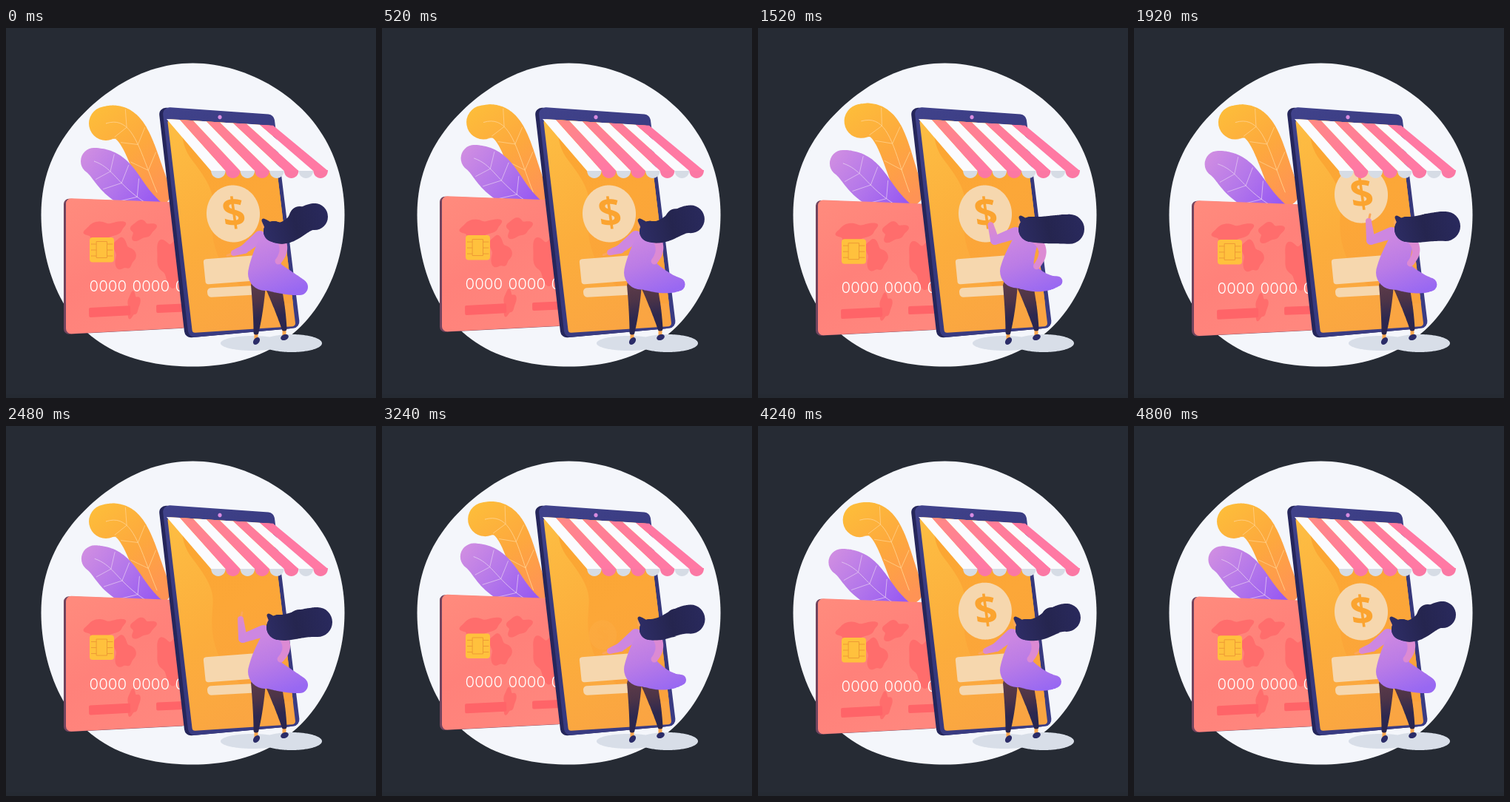
These frames come from a looping animation (500x500 px, 4.84 s). An HTML page with a canvas:

```html
<!DOCTYPE html>
<html lang="en">
<head>
<meta charset="utf-8">
<title>Mobile shop</title>
<style>
html, body { margin: 0; width: 100%; height: 100%; overflow: hidden; background: #262b34; }
canvas { display: block; width: 500px; height: 500px; }
</style>
</head>
<body>
<canvas id="stage" width="500" height="500"></canvas>
<script>
const ctx = document.getElementById('stage').getContext('2d');
const LOOP = 4840, SWAY = LOOP / 2, TAU = 2 * Math.PI;
const { sin, cos } = Math;

const mix = (a, b, k) => a + (b - a) * k;
const ease = (t, from, to) => {
  const k = Math.min(1, Math.max(0, (t - from) / (to - from)));
  return k * k * (3 - 2 * k);
};
const pt = (x, y) => ({ x, y });
const between = (a, b, k) => pt(mix(a.x, b.x, k), mix(a.y, b.y, k));

// Point at k on a Bezier curve with any number of control points.
function along(curve, k) {
  while (curve.length > 1) curve = curve.slice(1).map((p, i) => between(curve[i], p, k));
  return curve[0];
}

function gradient(x0, y0, x1, y1, ...colors) {
  const g = ctx.createLinearGradient(x0, y0, x1, y1);
  colors.forEach((c, i) => g.addColorStop(i / (colors.length - 1), c));
  return g;
}

// Soft body: circles of changing radius along a curve.
function sweep(curve, radius, fill, steps = 60) {
  ctx.beginPath();
  for (let i = 0; i <= steps; i++) {
    const k = i / steps, { x, y } = along(curve, k), r = radius(k);
    ctx.moveTo(x + r, y);
    ctx.arc(x, y, r, 0, TAU);
  }
  ctx.fillStyle = fill;
  ctx.fill();
}

// Closed outline around a centre, radius given by angle.
function ring(x, y, rx, ry, radius, fill, turn = 0) {
  ctx.save();
  ctx.translate(x, y);
  ctx.rotate(turn);
  ctx.beginPath();
  for (let a = 0; a < TAU; a += TAU / 180) {
    const r = radius(a);
    ctx.lineTo(rx * r * cos(a), ry * r * sin(a));
  }
  ctx.fillStyle = fill;
  ctx.fill();
  ctx.restore();
}
const oval = (x, y, rx, ry, fill, turn) => ring(x, y, rx, ry, () => 1, fill, turn);

// Rounded four-cornered sheet.
function sheet(corners, r, fill) {
  const start = between(corners[0], corners[3], 0.5);
  ctx.beginPath();
  ctx.moveTo(start.x, start.y);
  corners.forEach((p, i) => {
    const next = corners[(i + 1) % 4];
    ctx.arcTo(p.x, p.y, next.x, next.y, r);
  });
  ctx.closePath();
  ctx.fillStyle = fill;
  ctx.fill();
}

// Bar in a slanted plane.
function bar(x, y, w, h, r, fill, rise, lean = 0.1) {
  ctx.save();
  ctx.transform(1, -rise, lean, 1, x, y);
  ctx.beginPath();
  ctx.roundRect(0, 0, w, h, r);
  ctx.fillStyle = fill;
  ctx.fill();
  ctx.restore();
}

function line(color, width, ...points) {
  ctx.beginPath();
  points.forEach(p => ctx.lineTo(p.x, p.y));
  ctx.strokeStyle = color;
  ctx.lineWidth = width;
  ctx.lineCap = ctx.lineJoin = 'round';
  ctx.stroke();
}

function moved(dx, dy, draw, turn = 0, pivot = pt(0, 0)) {
  ctx.save();
  ctx.translate(pivot.x + dx, pivot.y + dy);
  ctx.rotate(turn);
  ctx.translate(-pivot.x, -pivot.y);
  draw();
  ctx.restore();
}

function backdrop() {
  ctx.fillStyle = '#262b34';
  ctx.fillRect(0, 0, 500, 500);
  ctx.fillStyle = '#252a32';
  ctx.fillRect(0, 495, 500, 5);
  ring(252.5, 252.5, 1, 1, a =>
    205 + sin(2 * a) ** 2 * (2.5 + 6 * sin(a) - 2 * sin(2 * a)), '#f4f6fb');
}

function leaf(spine, radius, fill, veinColor) {
  sweep(spine, radius, fill);
  const steps = Array.from({ length: 21 }, (_, i) => along(spine, i / 20));
  line(veinColor, 0.9, ...steps);
  for (const k of [0.2, 0.45, 0.7]) {
    const root = along(spine, k + 0.12), p = along(spine, k), q = along(spine, k + 0.01);
    const len = Math.hypot(q.x - p.x, q.y - p.y), r = radius(k) * 0.9 / len;
    for (const side of [-1, 1]) {
      line(veinColor, 0.8, pt(p.x - side * (q.y - p.y) * r, p.y + side * (q.x - p.x) * r), root);
    }
  }
}

const orangeLeaf = () => leaf([pt(135, 129), pt(172, 117), pt(180, 165), pt(204, 222)],
  k => 23 - 4 * k, gradient(125, 110, 215, 225, '#fdbc3a', '#fda83e', '#ff9355'), '#ffd08a');

const purpleLeaf = () => leaf([pt(119, 180), pt(148, 190), pt(150, 215), pt(200, 243)],
  k => 18 - 6 * k + 11 * sin(Math.PI * k),
  gradient(105, 170, 195, 240, '#cf8de2', '#b477ea', '#985af2'), '#e2c4f0');

function continent(x, y, rx, ry, turn, seed) {
  ring(x, y, rx, ry, a => 0.88 + 0.14 * sin(3 * a + seed) + 0.1 * sin(5 * a + 2 * seed), '#ff6d6c', turn);
}

function card() {
  const face = [pt(81, 230), pt(242, 236), pt(248, 405), pt(81, 413.5)];
  sheet(face.map(p => pt(p.x - 3, p.y + 0.5)), 7, '#71445e');
  sheet(face, 7, gradient(85, 230, 200, 410, '#ff8b7d', '#ff817a', '#ff877e'));
  continent(132, 274, 31, 14, -0.2, 2);
  continent(159, 306, 15, 24, -0.25, 0.6);
  continent(184, 273, 19, 14, -0.3, 1);
  continent(223, 314, 21, 34, -0.1, 3);
  continent(172, 374, 9, 19, 0.1, 2);
  bar(112, 378, 56, 13, 2, '#ff6468', 0.05, 0.02);
  bar(203, 374, 45, 11, 2, '#ff6468', 0.04, 0.02);

  bar(113, 283, 33, 33.5, 4, '#ffc13d', 0, 0);
  ctx.strokeStyle = '#ee9a35';
  ctx.lineWidth = 1;
  ctx.strokeRect(122.5, 288.5, 14, 22);
  for (const y of [292, 300, 308]) {
    for (const x of [115, 137]) line('#ee9a35', 1, pt(x, y), pt(x + 7, y));
  }
  ctx.fillStyle = '#fff';
  ctx.textAlign = 'left';
  ctx.textBaseline = 'alphabetic';
  ctx.font = '300 20.5px Inter, "Open Sans", sans-serif';
  ['0000', '0000', '0'].forEach((digits, i) => ctx.fillText(digits, 112.5 + 58 * i, 356));
}

function coin(t) {
  let x = 307, y = 251, size = 1, alpha = 1;
  if (t < 2800) {
    y = mix(251, 156, ease(t, 1680, 2380));
    if (t > 2380) return;
  } else {
    const grow = ease(t, 3180, 3660), settle = ease(t, 3720, 4400);
    x = mix(298, 306.3, grow) + 0.7 * settle;
    y = mix(284, 245, grow) + 6 * settle;
    size = mix(0.5, 1, grow);
    alpha = grow;
  }
  ctx.save();
  ctx.globalAlpha = alpha;
  ctx.translate(x, y);
  ctx.scale(size, size);
  oval(0, 0, 36, 38.5, '#f6d7ae', -0.1);
  ctx.transform(1, -0.06, 0.14, 1, 0, 0);
  ctx.font = 'bold 54px "Open Sans", sans-serif';
  ctx.textAlign = 'center';
  ctx.textBaseline = 'alphabetic';
  ctx.fillStyle = '#fba430';
  ctx.fillText('$', 1, 17.5);
  ctx.restore();
}

function tablet(t) {
  const body = [pt(211, 106.5), pt(362, 117), pt(397.5, 405), pt(247, 418.5)];
  sheet(body.map(p => pt(p.x - 5, p.y + 0.5)), 9, '#25265b');
  sheet(body, 9, gradient(215, 110, 390, 410, '#40428b', '#35377a', '#3b3d85'));
  sheet([pt(218, 123), pt(359, 132), pt(391.5, 403), pt(252, 412)], 4,
    gradient(225, 140, 380, 390, '#fdbc42', '#fcad3c', '#faa443'));
  ctx.save();
  ctx.clip();
  sweep([pt(300, 140), pt(345, 240), pt(330, 290), pt(400, 310)], k => 62 - 12 * sin(TAU * k),
    gradient(240, 140, 380, 350, '#fba631', '#fca738', '#faa23c'));
  bar(266.5, 312.5, 80, 34, 4, '#f6d7ae', 0.075);
  bar(271.5, 351.5, 78, 12.5, 5, '#f6d7ae', 0.055);
  coin(t);
  ctx.restore();
  oval(289, 120.5, 2.6, 2.8, '#d88be0');
}

function awning() {
  const top = i => pt(217 + 18 * i, 123 + 1.1 * i);
  const low = i => pt(277 + 19.75 * i, 193);
  for (let i = 0; i < 8; i++) {
    const [a, b, c, d] = [top(i), top(i + 1), low(i + 1), low(i)], pink = i % 2;
    ctx.beginPath();
    ctx.moveTo(d.x, d.y - 1);
    ctx.bezierCurveTo(d.x, 206.5, c.x, 206.5, c.x, c.y - 1);
    ctx.fillStyle = pink ? '#fb78a4' : '#d6dce5';
    ctx.fill();
    ctx.beginPath();
    [a, b, c, d].forEach(p => ctx.lineTo(p.x, p.y));
    ctx.fillStyle = pink
      ? gradient(a.x, a.y, d.x, d.y, `rgb(255, ${140 - 3 * i}, ${126 + 5 * i})`, '#ff79a4')
      : '#fbfbfe';
    ctx.fill();
  }
}

function legs() {
  oval(333, 426, 43, 10, '#d8dee8');
  oval(386, 426, 41, 12, '#d8dee8');
  const skin = '#f9a74f', navy = '#2b2c68';
  const tights = gradient(340, 345, 350, 415, '#5d3b49', '#4d3447', '#2d284f', '#28254e');
  const leg = (hip, knee, ankle, width, turn) => {
    line(skin, 5, ankle, pt(ankle.x, ankle.y + 9));
    sweep([hip, knee, ankle], k => mix(width, 3.5, k), tights);
    oval(ankle.x + 0.5, ankle.y + 12, 5.5, 3.8, navy, turn);
  };
  leg(pt(341, 348), pt(341, 385), pt(338, 411), 10, -0.9);
  leg(pt(361, 348), pt(371, 380), pt(376, 406), 11, -0.4);
}

function woman(t, sway) {
  const raise = ease(t, 480, 940) * (1 - ease(t, 2540, 3060));
  const swipe = raise * ease(t, 1400, 1900);
  const skin = '#fba659', lilac = '#cd87e1';
  legs();

  const shoulder = pt(343 + 5 * raise, 282 - 5 * raise);
  const elbow = between(pt(322, 299), pt(320, 287), raise);
  const wrist = between(pt(308, 304), pt(314 + 3 * swipe, 267 - 6 * swipe), raise);
  const finger = between(pt(299, 307.5), pt(312 + 7 * swipe, 263 - 11 * swipe), raise);
  oval(350 + 6 * raise, 266 - 2 * raise, 5, 7, skin);
  line(skin, 3, wrist, finger);
  sweep([shoulder, elbow], k => 8 - 2 * k, lilac);
  sweep([elbow, wrist], k => 6 - 2 * k, gradient(elbow.x, elbow.y, finger.x, finger.y, lilac, '#e28cc6'));

  const coat = gradient(345, 270, 378, 360, '#d28be0', '#bb7ce6', '#9868f2');
  sweep([pt(360 + 4 * raise, 286 - 3 * raise), pt(350 + raise, 312), pt(350, 332 - 4 * sway)],
    k => 16 + 7 * k, coat);
  sweep([pt(352, 332 - 4 * sway), pt(370, 341), pt(387, 347), pt(397 + 9 * sway, 350 - 9 * sway)],
    k => mix(22, 11 - 5 * sway, k), coat);

  const out = raise * (3 + 6.5 * sway);
  sweep([pt(371 + 3 * raise, 285), pt(380 + 1.6 * out, 300), pt(368 + out, 315 + 8 * raise * sway)],
    k => 6 - 1.5 * k, '#dc8ad3');

  const nape = pt(362 + 7 * raise, 275 - 3 * raise);
  const crown = pt(348 + 7 * raise, 260 - 4 * raise);
  const end = pt(417 + 4 * raise, 255 + 8 * sway + 10 * raise);
  const dip = (1 - raise) * (1 - sway);
  const hair = gradient(348, 275, 434, 255, '#2e2d66', '#25254f', '#29295c');
  sweep([crown, nape], k => 2.5 + 7 * k, hair);
  sweep([nape, pt(385, mix(274, 285, dip)), pt(397, end.y)], () => 14 + 3 * raise, hair);
  sweep([nape, pt(385, mix(274, 285, dip)), pt(397, end.y), end],
    k => mix(14 + 3 * raise, 18 + 2 * (1 - dip), k), hair);
}

function render(now) {
  const t = Math.floor((now % LOOP) / 40) * 40;
  const phase = TAU * t / SWAY;
  const drift = sin(phase), sway = (1 - cos(phase)) / 2;
  backdrop();
  moved(0, 0, orangeLeaf, 0.05 * sway, pt(212, 235));
  moved(5 * drift, -3 * drift, purpleLeaf, 0.012 * drift, pt(205, 235));
  moved(0, -3 * drift, card);
  tablet(t);
  awning();
  woman(t, sway);
}

let start;
function tick(now) {
  start ??= now;
  render(now - start);
  requestAnimationFrame(tick);
}
render(0);
requestAnimationFrame(tick);
</script>
</body>
</html>
```
